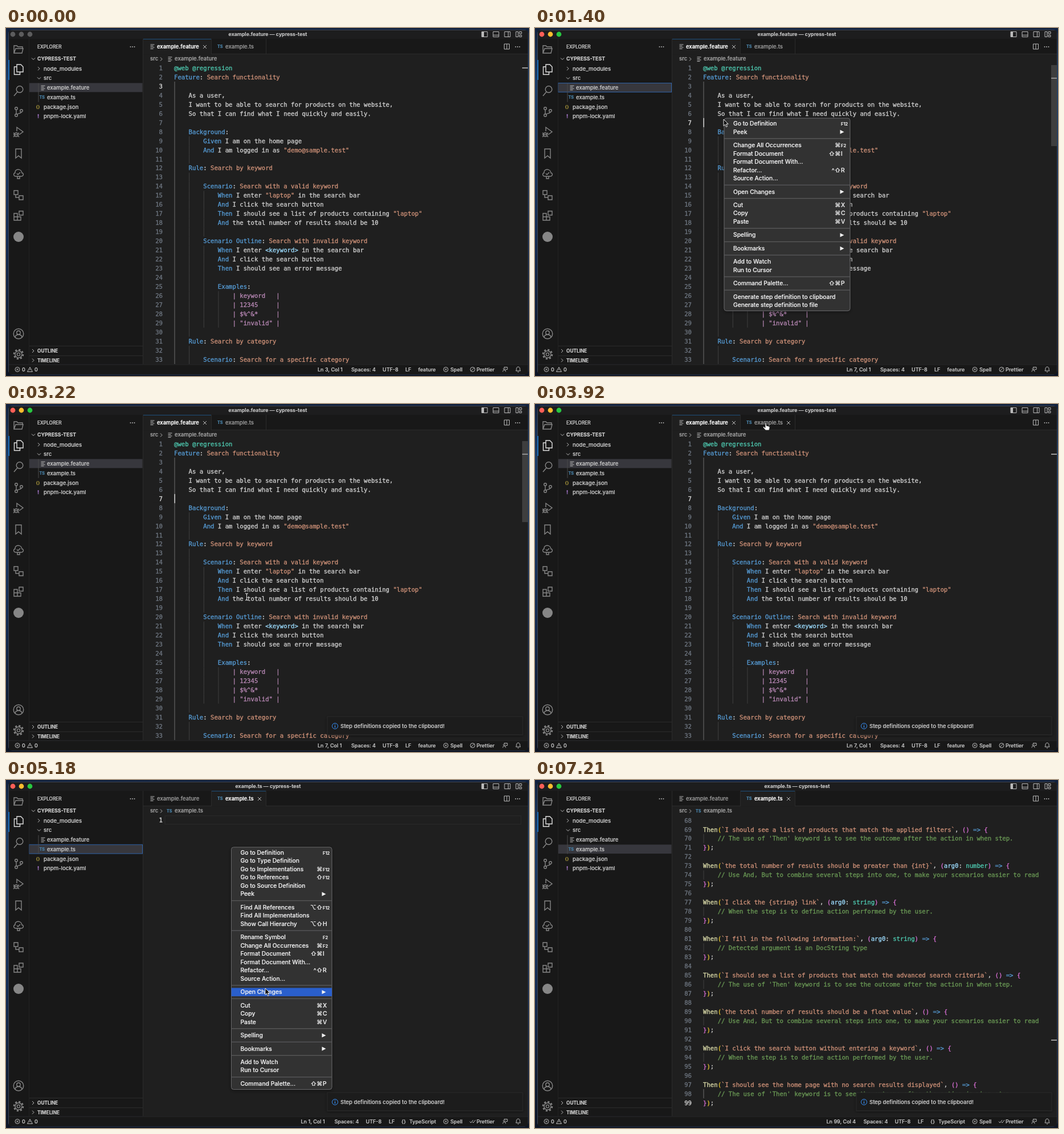
Animation of 918 by 610 pixels, one loop 7.35 s. Source, as an HTML page:

```html
<!DOCTYPE html>
<html lang="en">
<head>
<meta charset="utf-8">
<title>Generate step definitions</title>
<style>
  html, body { margin: 0; width: 100%; height: 100%; overflow: hidden; background: #0b1526; }
  svg { display: block; width: 100%; height: 100%; }
  text { white-space: pre; font: 500 9.6px Inter, sans-serif; color: #ccc; fill: currentColor; stroke: currentColor; stroke-width: .2px; }
  .code { font: 10.65px "DejaVu Sans Mono", monospace; stroke-width: .32px; color: #d0d0d0; }
  .num { color: #6e7681; text-anchor: end; }
  .now { color: #e0e0e0; }
  .small { font-size: 9px; }
  .head { font-size: 8.3px; }
  .bold { font-weight: 700; }
  .root { font-size: 8.9px; font-weight: 700; }
  .title { font-weight: 600; font-size: 8.9px; text-anchor: middle; }
  .tab { color: #9d9d9d; }
  .tab.open { color: #fff; font-weight: 600; font-size: 9.4px; }
  .crumb { color: #a9a9a9; }
  .menu text { font-size: 10.3px; color: #f4f4f4; }
  .menu .fkey { font-size: 7.5px; font-weight: 600; }
  .end { text-anchor: end; }
  .ts { font-size: 7.3px; font-weight: 700; color: #4b86ad; }
  .json { font-size: 8px; color: #b5a13e; }
  .yaml { font-weight: 700; color: #a074c4; }
  .line { fill: none; stroke: #bbb; stroke-width: 1; }
  .bar .line { stroke: #868686; stroke-width: 1.4; }
  .bar .active .line { stroke: #e0e0e0; }
</style>
</head>
<body>
<svg id="stage" viewBox="0 0 918 610" preserveAspectRatio="none"></svg>
<script>
const LOOP = 7350, TICK = 70;
const CODE_X = 295, CHAR = 6.412, ROW = 15.97, TREE_ROW = 16.75;
const INKS = {
  teal: '#4ec9b0', blue: '#569cd6', orange: '#ce9178', sky: '#9cdcfe', purple: '#b888b5',
  green: '#6a9955', yellow: '#dcdcaa', gold: '#e8c52c', pink: '#da70d6'
};

// Markup helpers
const esc = s => s.replace(/&/g, '&amp;').replace(/</g, '&lt;').replace(/>/g, '&gt;');
const text = (x, y, s, cls = '') => `<text x="${x}" y="${y + 3.4}" class="${cls}">${esc(s)}</text>`;
const rect = (x, y, w, h, fill, more = '') => `<rect x="${x}" y="${y}" width="${w}" height="${h}" fill="${fill}" ${more}/>`;
const circle = (x, y, r, more = 'class="line"') => `<circle cx="${x}" cy="${y}" r="${r}" ${more}/>`;
const path = (d, more = 'class="line"') => `<path d="${d}" ${more}/>`;
const at = (x, y, s) => `<g transform="translate(${x} ${y})">${s}</g>`;
const icon = (x, y, d) => at(x, y, path(d));
const on = (spans, s) => `<g data-on="${spans}">${s}</g>`;

const RIGHT = 'M-2-3l3 3l-3 3', DOWN = 'M-3-1.5l3 3l3-3', CROSS = 'M-3-3l6 6M3-3l-6 6', LINES = 'M-3.5-3.5h7M-3.5-1h5M-3.5 1.5h7M-3.5 4h5';
const dots = (x, y) => [-3.5, 0, 3.5].map(d => circle(x + d, y, .9, 'fill="#bbb"')).join('');

// Syntax colouring
const GHERKIN = /(?<purple>^ *\|.*)|(?<teal>@\w+)|(?<blue>^ *(?:Feature|Background|Rule|Scenario Outline|Scenario|Examples|Given|And|When|Then)\b)|(?<orange>(?<=^ *(?:Feature|Rule|Scenario|Scenario Outline): ).*|"[^"]*")|(?<sky><\w+>)/g;
const SCRIPT = /(?<green>\/\/.*)|(?<orange>`[^`]*`)|(?<yellow>^(?:Then|When))|(?<sky>arg0)|(?<teal>\b(?:number|string)\b)|(?<blue>=>)|(?<gold>(?<=^\w+)\(|(?<=^})\))|(?<pink>[(){}])/g;

function paint(line, rules) {
  let out = '', end = 0;
  for (const m of line.matchAll(rules)) {
    const ink = Object.keys(m.groups).find(k => m.groups[k] !== undefined);
    const color = INKS[ink];
    out += esc(line.slice(end, m.index)) + `<tspan fill="${color}" stroke="${color}">${esc(m[0])}</tspan>`;
    end = m.index + m[0].length;
  }
  return out + esc(line.slice(end));
}

function guideCount(lines, i) {
  const indent = s => s.search(/\S/);
  if (lines[i]) return indent(lines[i]) / 4;
  const above = lines.slice(0, i).reverse().find(Boolean), below = lines.slice(i + 1).find(Boolean);
  if (!above || !below) return 0;
  const a = indent(above), b = indent(below);
  return a === b ? a / 4 : 1 + Math.floor(Math.min(a, b) / 4);
}

function editor(lines, first, top, rules) {
  return lines.map((line, i) => {
    const y = top + i * ROW;
    let out = `<text x="275" y="${y + 3.8}" class="code num">${first + i}</text>`;
    for (let g = 0; g < guideCount(lines, i); g++)
      out += rect(CODE_X + .5 + g * 4 * CHAR, y - ROW / 2, 1, ROW, '#404040');
    return out + `<text x="${CODE_X}" y="${y + 3.8}" class="code">${paint(line, rules)}</text>`;
  }).join('');
}
const activeNumber = (n, y) => rect(258, y - 7, 18, 14, '#1f1f1f') + text(275, y + .4, String(n), 'code num now');
const activeGuide = (y, height) => rect(CODE_X + .5, y - ROW / 2, 1, height, '#606060');
const caret = (x, y) => rect(x, y - 8, 1.4, 16, '#d8d8d8');
const rulerMark = y => rect(906, y - 1, 10, 2, '#9a9a9a');

const feature = `@web @regression
Feature: Search functionality

    As a user,
    I want to be able to search for products on the website,
    So that I can find what I need quickly and easily.

    Background:
        Given I am on the home page
        And I am logged in as "demo@sample.test"

    Rule: Search by keyword

        Scenario: Search with a valid keyword
            When I enter "laptop" in the search bar
            And I click the search button
            Then I should see a list of products containing "laptop"
            And the total number of results should be 10

        Scenario Outline: Search with invalid keyword
            When I enter <keyword> in the search bar
            And I click the search button
            Then I should see an error message

            Examples:
                | keyword   |
                | 12345     |
                | $%^&*     |
                | "invalid" |

    Rule: Search by category

        Scenario: Search for a specific category`.split('\n');

const NOTES = {
  then: "The use of 'Then' keyword is to see the outcome after the action in when step.",
  and: 'Use And, But to combine several steps into one, to make your scenarios easier to read',
  when: 'When the step is to define action performed by the user.',
  doc: 'Detected argument is an DocString type'
};
const script = [
  ['Then', 'I should see a list of products that match the applied filters', '', 'then'],
  ['When', 'the total number of results should be greater than {int}', 'arg0: number', 'and'],
  ['When', 'I click the {string} link', 'arg0: string', 'when'],
  ['When', 'I fill in the following information:', 'arg0: string', 'doc'],
  ['Then', 'I should see a list of products that match the advanced search criteria', '', 'then'],
  ['When', 'the total number of results should be a float value', '', 'and'],
  ['When', 'I click the search button without entering a keyword', '', 'when'],
  ['Then', 'I should see the home page with no search results displayed', '', 'then']
].flatMap(([word, step, args, note]) =>
  ['', `${word}(\`${step}\`, (${args}) => {`, `    // ${NOTES[note]}`, '});']);

// Context menus
class Menu {
  constructor(id, left, top, right, items) {
    Object.assign(this, { id, left, right, rows: [] });
    const key = right - 16.5;
    let y = top, body = '';
    for (const item of items) {
      if (item === '-') {
        body += rect(left, y - 3.6, right - left, 1.4, '#585859');
        y += 8.95;
        continue;
      }
      const [label, hint = ''] = item.split('|');
      this.rows.push(y);
      body += text(left + 16, y, label);
      if (hint === '>') body += path(`M${key - 1} ${y - 3.6}l7 3.6l-7 3.6z`, 'fill="#f2f2f2"');
      else if (hint) {
        const [, mods, letter] = hint.match(/^([⌘⇧⌥^]*)(.*)$/);
        body += text(key, y, mods, 'end') + text(key + .5, y, letter, letter.length > 1 ? 'fkey' : '');
      }
      y += 14.5;
    }
    const box = fill => rect(left, top - 9.6, right - left, y - top + 5, fill, 'rx="4" stroke="#68686a" stroke-width="1"');
    this.markup = `<g id="${id}" class="menu" filter="url(#shade)">${box('#303031')}` +
      rect(left, 0, right - left, 14.6, '#2b5fcc', 'class="hover"') + body + '</g>';
  }
  attach() {
    this.el = document.getElementById(this.id);
    this.hover = this.el.querySelector('.hover');
  }
  show(opacity, pointer, lit) {
    this.el.style.display = opacity > 0 ? '' : 'none';
    this.el.setAttribute('opacity', opacity);
    const row = lit && this.rows.find(y => Math.abs(pointer.y - y) <= 7.3);
    this.hover.style.display = row ? '' : 'none';
    if (row) this.hover.setAttribute('y', row - 7.3);
  }
}
const COMMON = ['Change All Occurrences|⌘F2', 'Format Document|⇧⌘I', 'Format Document With...', 'Refactor...|^⇧R', 'Source Action...',
  '-', 'Open Changes|>', '-', 'Cut|⌘X', 'Copy|⌘C', 'Paste|⌘V', '-', 'Spelling|>', '-', 'Bookmarks|>',
  '-', 'Add to Watch', 'Run to Cursor', '-', 'Command Palette...|⇧⌘P'];
const featureMenu = new Menu('featureMenu', 332, 167.7, 553, ['Go to Definition|F12', 'Peek|>', '-', ...COMMON,
  '-', 'Generate step definition to clipboard', 'Generate step definition to file']);
const scriptMenu = new Menu('scriptMenu', 395.5, 127.4, 572, ['Go to Definition|F12', 'Go to Type Definition', 'Go to Implementations|⌘F12',
  'Go to References|⇧F12', 'Go to Source Definition', 'Peek|>', '-', 'Find All References|⌥⇧F12', 'Find All Implementations',
  'Show Call Hierarchy|⌥⇧H', '-', 'Rename Symbol|F2', ...COMMON]);

// Window parts
const FEATURE = '0-4060', SCRIPT_ON = '4060-7350';

const titleBar = () => rect(5, 4, 911, 15, '#1d1d1e') +
  on('0-980', [12, 27, 42].map(x => circle(x, 11, 4.4, 'fill="#5c5c5d"')).join('')) +
  on('980-7350', ['#ff5f57', '#febc2e', '#28c840'].map((c, i) => circle(12 + 15 * i, 11, 4.4, `fill="${c}"`)).join('')) +
  on(FEATURE, text(459.5, 11, 'example.feature — cypress-test', 'title')) +
  on(SCRIPT_ON, text(460, 11, 'example.ts — cypress-test', 'title')) +
  [840, 860, 880].map(x => icon(x, 11, 'M-5-4.5h10v9h-10z')).join('') +
  rect(835, 6.5, 4, 9, '#bbb') + path('M855 12.5h10M881.5 6.5v9') +
  icon(900, 11, 'M-5-4.5h4v9h-4zM1-4.5h4v3.5h-4zM1 1.5h4v3h-4z');

const activityBar = () => `<g class="bar">${rect(5, 19, 35.5, 570.5, '#181818')}${rect(4, 56, 2, 35, '#1f6fb8')}` +
  icon(22, 37, 'M-8 7V-6h5l2 2h8v3M-8 7l3-8h13l-2 8z') +
  `<g class="active">${icon(22, 73, 'M-3-9h7l4 4v9h-11zM-3-5h-4.5v13.5h10v-4.5')}</g>` +
  at(22, 110, circle(2, -2.5, 5.8) + path('M-2 2l-6 7')) +
  at(22, 147, circle(-4, -6, 2.3) + circle(-4, 6, 2.3) + circle(5, -2, 2.3) + path('M-4-4v8M5 0c0 3-5 2-8 4.5')) +
  at(22, 183, path('M-3-2v-7l11 8l-7 5') + circle(-4, 4, 3.3) + path('M-9 1l2 1M-9 4h2M-9 8l2-2M1 1l-2 1M1 8l-2-2M-7 4h6')) +
  icon(22, 220, 'M-5-8h10v16l-5-4l-5 4z') +
  icon(22, 256, 'M-4 4c-6 0-5-6-2-6c-1-8 11-8 12 0c3 0 4 6-2 6zM-2 4v4h4v-4M-3-1l2 2l4-4') +
  icon(22, 293, 'M-8-8h7v7h-7zM1 1h7v7h-7zM-5-1v5h6') +
  icon(22, 329, 'M-8-4h6v6h6v6h-12zM-8 2h6v6M1-8h7v7h-7z') +
  circle(22, 366, 9, 'fill="#868686"') +
  at(22, 536, circle(0, 0, 8.8) + circle(0, -2, 3.2) + path('M-6 6c1-6 11-6 12 0')) +
  at(22, 572, circle(0, 0, 2.6) + circle(0, 0, 6) + circle(0, 0, 8, 'class="line" stroke-dasharray="3.1 3.183" style="stroke-width:2.6"')) + '</g>';

function sidebar() {
  const rowY = i => 71.2 + i * TREE_ROW;
  const select = (i, more = '') => rect(40.5, rowY(i) - 8.2, 199, 15.8, '#37373d', more);
  const ring = 'stroke="#2e62a8" stroke-width="1"';
  return rect(40.5, 19, 200, 570.5, '#181818') + rect(40, 19, 1, 570.5, '#2b2b2b') +
    on('0-1400 2940-4060', select(2)) + on('1400-2940', select(2, ring)) +
    on('4060-4760 6580-7350', select(3)) + on('4760-6580', select(3, ring)) +
    text(55, 32.7, 'EXPLORER', 'head') + dots(222, 33) +
    icon(48, 54, DOWN) + text(55, 53.8, 'CYPRESS-TEST', 'root') +
    icon(58, rowY(0), RIGHT) + text(66, rowY(0), 'node_modules') +
    icon(58, rowY(1), DOWN) + text(66, rowY(1), 'src') +
    rect(56.5, rowY(2) - 8, 1, 33, '#4a4a4a') +
    icon(65, rowY(2), LINES) + text(72, rowY(2), 'example.feature') +
    text(58.5, rowY(3) - .6, 'TS', 'ts') + text(72, rowY(3), 'example.ts') +
    text(52.5, rowY(4) - .8, '{}', 'json') + text(66, rowY(4), 'package.json') +
    text(55, rowY(5), '!', 'yaml') + text(66, rowY(5), 'pnpm-lock.yaml') +
    ['OUTLINE', 'TIMELINE'].map((s, i) => rect(41, 557 + i * 17, 199, 1, '#2b2b2b') +
      icon(48, 566 + i * 16.5, RIGHT) + text(55, 566 + i * 16.5, s, 'head bold')).join('');
}

function tabs() {
  const openTab = (x, w) => rect(x, 19, w, 27.5, '#1f1f1f') + rect(x, 19, w, 1, '#1d4f7c');
  const crumb = (mark, name) => text(253, 54, 'src', 'crumb') + icon(273, 54.5, RIGHT) + mark + text(296, 54, name, 'crumb');
  return rect(241, 19, 675, 26.5, '#181818') + rect(241, 45, 675, 1, '#2b2b2b') +
    on(FEATURE, openTab(241, 119) + text(265, 32.5, 'example.feature', 'tab open') + icon(349, 33, CROSS) +
      text(385, 32.5, 'example.ts', 'tab') + crumb(icon(288, 54.5, LINES), 'example.feature')) +
    on(SCRIPT_ON, openTab(361, 95) + text(265, 32.5, 'example.feature', 'tab') +
      text(385, 32.5, 'example.ts', 'tab open') + crumb(text(282, 54, 'TS', 'ts'), 'example.ts')) +
    on('3570-7350', icon(445, 33, CROSS)) +
    rect(360, 19, 1, 26.5, '#2b2b2b') + rect(456, 19, 1, 26.5, '#2b2b2b') +
    icon(257, 32.5, LINES) + text(371, 32, 'TS', 'ts') +
    icon(879, 32.5, 'M-4.5-4.5h9v9h-9zM0-4.5v9') + dots(898, 33);
}

function editors() {
  const bottom = 565.8, top = bottom - 31 * ROW;
  return rect(241, 19, 675, 570.5, '#1f1f1f') +
    on(FEATURE, editor(feature, 1, 70, GHERKIN) + activeGuide(70 + 2 * ROW, 31 * ROW)) +
    on('0-980', activeNumber(3, 70 + 2 * ROW) + rulerMark(70)) +
    on('980-4060', activeNumber(7, 70 + 6 * ROW) + rulerMark(88)) +
    on('140-3570', rect(906, 65, 10, 142, '#797979', 'opacity=".35"')) +
    on('980-3430', caret(CODE_X + .5, 70 + 6 * ROW)) +
    on('4060-6020', rect(279, 62.8, 625, 14.6, 'none', 'stroke="#2b2b2b"')) +
    on('4060-6720', activeNumber(1, 70)) +
    on('4060-4550 6020-6720', caret(CODE_X + .5, 70)) +
    on('6720-7350', editor(script, 68, top, SCRIPT) + activeNumber(99, bottom) +
      activeGuide(bottom - ROW, ROW) + rulerMark(456)) +
    on('6720-7210', caret(CODE_X + 3 * CHAR, bottom));
}

function statusBar() {
  const label = (x, s) => text(x, 598.3, s, 'small');
  const stop = (x, d) => circle(x, 598.5, 4) + icon(x, 598.5, d);
  return rect(5, 589.5, 911, 17.5, '#181818') + rect(5, 589.5, 911, 1, '#2b2b2b') +
    stop(20, 'M-1.5-1.5l3 3M1.5-1.5l-3 3') + label(28, '0') + icon(42, 598.5, 'M0-4l4.5 8h-9zM0-1v2.5') + label(50, '0') +
    on('0-980', label(547, 'Ln 3, Col 1')) + on('980-4060', label(547, 'Ln 7, Col 1')) +
    on('4060-6720', label(517.5, 'Ln 1, Col 1')) + on('6720-7350', label(511.5, 'Ln 99, Col 4')) +
    on(FEATURE, label(606, 'Spaces: 4') + label(661, 'UTF-8') + label(701, 'LF') + label(723.5, 'feature') + stop(819, 'M2.8-2.8l-5.6 5.6')) +
    on(SCRIPT_ON, label(576.5, 'Spaces: 4') + label(631.5, 'UTF-8') + label(672, 'LF') + label(694, '{}') + label(708, 'TypeScript') +
      icon(819, 598.5, 'M-5 0l2 2.5l4-5M0 1l1 1.5l4-5')) +
    stop(772, 'M-1.5-1.5l3 3M1.5-1.5l-3 3') + label(780, 'Spell') + label(826, 'Prettier') +
    at(876, 598.5, path('M-4 4c0-4 5-4 5 0M-2-4h6v4h-2l-2 2') + circle(-1.5, -1, 1.5)) +
    icon(899, 598.5, 'M-4 2.5h8l-1-2v-2c0-4-6-4-6 0v2zM-1 4.5h2');
}

const toast = () => on('3220-7350', `<g filter="url(#shade)">${rect(564, 548, 343, 32, '#1f1f1f', 'stroke="#2b2b2b"')}</g>` +
  circle(577.5, 564.5, 5, 'fill="none" stroke="#3794ff"') + path('M577.5 563.5v4M577.5 561v1.3', 'stroke="#3794ff" stroke-width="1.2"') +
  text(587, 564.5, 'Step definitions copied to the clipboard!'));

const pointerShapes = `<g id="pointer">` +
  path('M0 0v11.5l2.6-2.4l1.9 4.3l2-.9l-1.9-4.2h3.6z', 'data-shape="arrow" fill="#111" stroke="#fff" stroke-width=".9"') +
  path('M-1 1c0-2 2.2-2 2.2 0v4l4 1c2 .5 2 2 1.5 4l-1 3h-6l-4-4.5c-.8-1.3 .6-2.3 1.6-1.3l1.7 1.5z', 'data-shape="hand" fill="#fff" stroke="#222" stroke-width=".8"') +
  path('M-2.5-6q2.5 0 2.5 2v8q0 2-2.5 2M2.5-6q-2.5 0-2.5 2M2.5 6q-2.5 0-2.5-2', 'data-shape="beam" fill="none" stroke="#ddd" stroke-width="1.1"') + '</g>';

const stage = document.getElementById('stage');
stage.innerHTML = `<defs>
    <linearGradient id="desk" x2="0" y2="1"><stop stop-color="#10203c"/><stop offset=".15" stop-color="#1b3d68"/><stop offset=".6" stop-color="#152c52"/><stop offset="1" stop-color="#0c1424"/></linearGradient>
    <filter id="shade"><feDropShadow dx="0" dy="2" stdDeviation="3" flood-opacity=".4"/></filter>
    <clipPath id="frame"><rect x="4" y="3" width="912.5" height="604.5" rx="6"/></clipPath>
  </defs>` + rect(0, 0, 918, 610, 'url(#desk)') +
  rect(4.5, 3.5, 911.5, 603.5, 'none', 'rx="6" stroke="#3f4756"') +
  `<g clip-path="url(#frame)">${editors()}${tabs()}${sidebar()}${activityBar()}${rect(240, 19, 1, 570.5, '#2b2b2b')}${titleBar()}${statusBar()}${toast()}</g>` +
  featureMenu.markup + scriptMenu.markup + pointerShapes;

// Motion
const TRAIL = [
  [70, 560, 420], [840, 331, 163], [1120, 331, 160], [1680, 331, 160], [2450, 430, 469], [2940, 430, 469],
  [3710, 405, 33], [4060, 405, 33], [4620, 396, 117], [4900, 396, 117], [5180, 455, 365], [5320, 455, 365],
  [5670, 452, 425], [LOOP, 452, 425]
];
function pointerAt(t) {
  const i = Math.max(1, TRAIL.findIndex(p => p[0] > t));
  const [t0, x0, y0] = TRAIL[i - 1], [t1, x1, y1] = TRAIL[i];
  const u = Math.max(0, (t - t0) / (t1 - t0)), k = u * u * (3 - 2 * u);
  return { x: x0 + (x1 - x0) * k, y: y0 + (y1 - y0) * k };
}

const within = (t, a, b) => t >= a && t < b;
const menuOpacity = (t, open, close) => t < open ? 0 : Math.max(0, Math.min(1, 1 - (t - close) / 140));
const timed = [...stage.querySelectorAll('[data-on]')].map(el =>
  ({ el, spans: el.dataset.on.split(' ').map(s => s.split('-').map(Number)) }));
const pointer = document.getElementById('pointer');
featureMenu.attach();
scriptMenu.attach();

function draw(t) {
  for (const { el, spans } of timed)
    el.style.display = spans.some(([a, b]) => within(t, a, b)) ? '' : 'none';
  const p = pointerAt(t);
  // a chosen item blinks off for one tick
  featureMenu.show(menuOpacity(t, 1400, 2870), p, t > 1680 && !within(t, 2800, 2870));
  scriptMenu.show(menuOpacity(t, 4760, 6580), p, t > 4900 && !within(t, 5950, 6020));
  const inMenu = within(t, 1400, 3010) || within(t, 4760, 6720);
  const shape = inMenu ? 'arrow' : p.y < 46 ? 'hand' : 'beam';
  pointer.style.display = within(t, 70, 6580) ? '' : 'none';
  pointer.setAttribute('transform', `translate(${p.x} ${p.y})`);
  for (const el of pointer.children) el.style.display = el.dataset.shape === shape ? '' : 'none';
}

const start = performance.now();
function frame() {
  const t = (performance.now() - start) % LOOP;
  draw(Math.floor(t / TICK + 1e-6) * TICK);
  requestAnimationFrame(frame);
}
frame();
</script>
</body>
</html>
```
